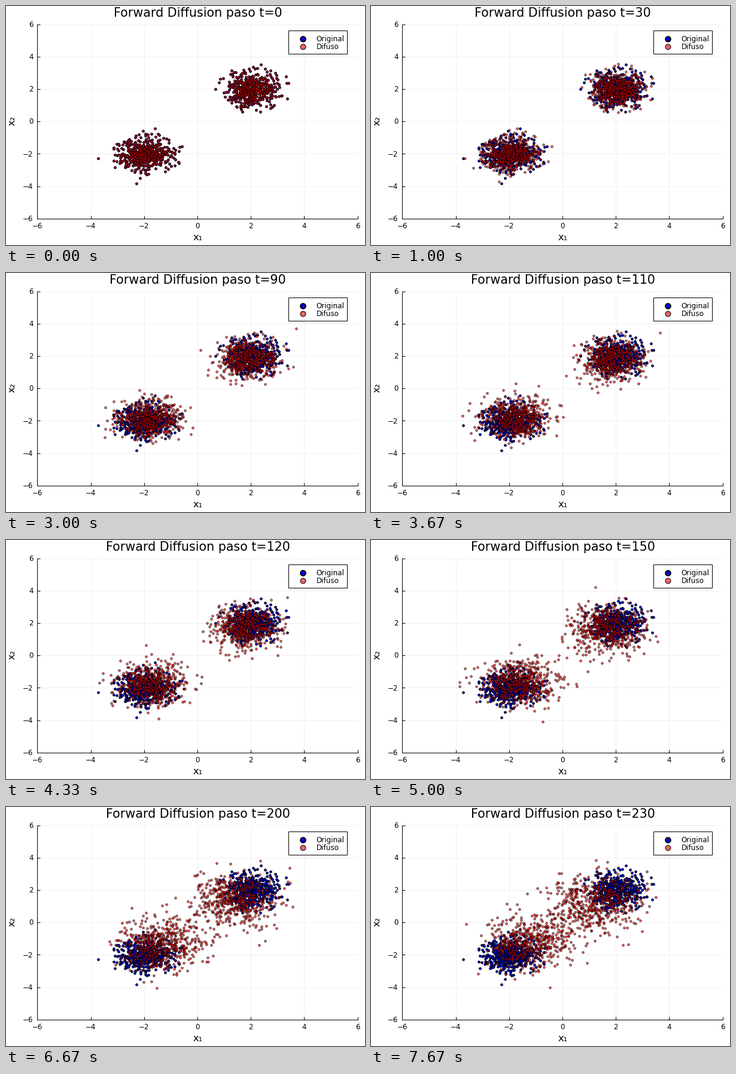
These frames come from a looping animation (600x400 px, 8000 ms). A matplotlib script:

```python
import numpy as np
import matplotlib.pyplot as plt
from matplotlib.animation import FuncAnimation

W, H, DPI = 600, 400, 100
LEFT, RIGHT, TOP, BOTTOM = 52.4, 587.6, 30.5, 355.7
PT = 72 / DPI  # points per pixel
FRAMES, STEP = 24, 10
PER_CLUSTER = 500
SPREAD = 0.5

plt.rcParams["font.family"] = "DejaVu Sans"
rng = np.random.default_rng(7)


def to_data(x, y):
    return ((x - LEFT) / (RIGHT - LEFT) * 12 - 6,
            6 - (y - TOP) / (BOTTOM - TOP) * 12)


def diffuse(start):
    """Forward noising with a linear schedule, keeping every STEP-th state."""
    x, states = start, [start]
    betas = np.linspace(1e-4, 0.02, 500)[:(FRAMES - 1) * STEP]
    for t, beta in enumerate(betas, 1):
        x = np.sqrt(1 - beta) * x + np.sqrt(beta) * rng.normal(size=x.shape)
        if t % STEP == 0:
            states.append(x)
    return states


centers = rng.permutation(np.repeat([-2, 2], PER_CLUSTER))[:, None]
points = rng.normal(centers, SPREAD, (2 * PER_CLUSTER, 2))
states = diffuse(points)

fig = plt.figure(figsize=(W / DPI, H / DPI), dpi=DPI, facecolor="white")
ax = fig.add_axes([LEFT / W, 1 - BOTTOM / H, (RIGHT - LEFT) / W, (BOTTOM - TOP) / H])
ticks = range(-6, 7, 2)
ax.set(xlim=(-6, 6), ylim=(-6, 6), xticks=ticks, yticks=ticks)
ax.set_axisbelow(True)
ax.grid(color="#f0f0f0", lw=PT)
ax.tick_params(direction="in", length=5 * PT, width=PT,
               labelbottom=False, labelleft=False)
ax.spines[["top", "right"]].set_visible(False)
ax.spines[["left", "bottom"]].set_linewidth(PT)


def label(x, y, text, px, ha="center", va="baseline", **kw):
    return fig.text(x / W, 1 - y / H, text, fontsize=px * PT, ha=ha, va=va, **kw)


for v in ticks:
    name = str(v).replace("-", "\u2212")
    along = (v + 6) / 12
    label(LEFT + along * (RIGHT - LEFT), 371.5, name, 11.8)
    label(45.5, BOTTOM - along * (BOTTOM - TOP) + 4.3, name, 11.8, ha="right")

label(320.5, 391.5, "x\u2081", 16.3)
label(18, 192, "x\u2082", 16.3, ha="right", va="center", rotation=90)
title = label(320.5, 18, "", 20.7)

BLUE = dict(facecolor="blue", edgecolor="black")
RED = dict(facecolor="red", edgecolor="black", alpha=0.6)
DOT = dict(s=(3.6 * PT) ** 2, linewidth=PT)
ax.scatter(*points.T, zorder=3, **DOT, **BLUE)
noisy = ax.scatter(*points.T, zorder=4, **DOT, **RED)

(x0, y0), (x1, y1) = to_data(471.8, 80.2), to_data(569.8, 41.2)
ax.add_patch(plt.Rectangle((x0, y0), x1 - x0, y1 - y0, facecolor="white",
                           edgecolor="black", lw=PT, zorder=5))
for y, name, style in ((54.7, "Original", BLUE), (67.7, "Difuso", RED)):
    ax.scatter(*to_data(495.7, y), s=(8.6 * PT) ** 2, linewidth=2 * PT, zorder=6, **style)
    label(518.5, y + 4.3, name, 11.9, ha="left")


def draw(i):
    title.set_text(f"Forward Diffusion paso t={i * STEP}")
    noisy.set_offsets(states[i])
    return title, noisy


anim = FuncAnimation(fig, draw, frames=FRAMES, interval=8000 / FRAMES,
                     repeat=True, repeat_delay=0)
plt.show()
```
